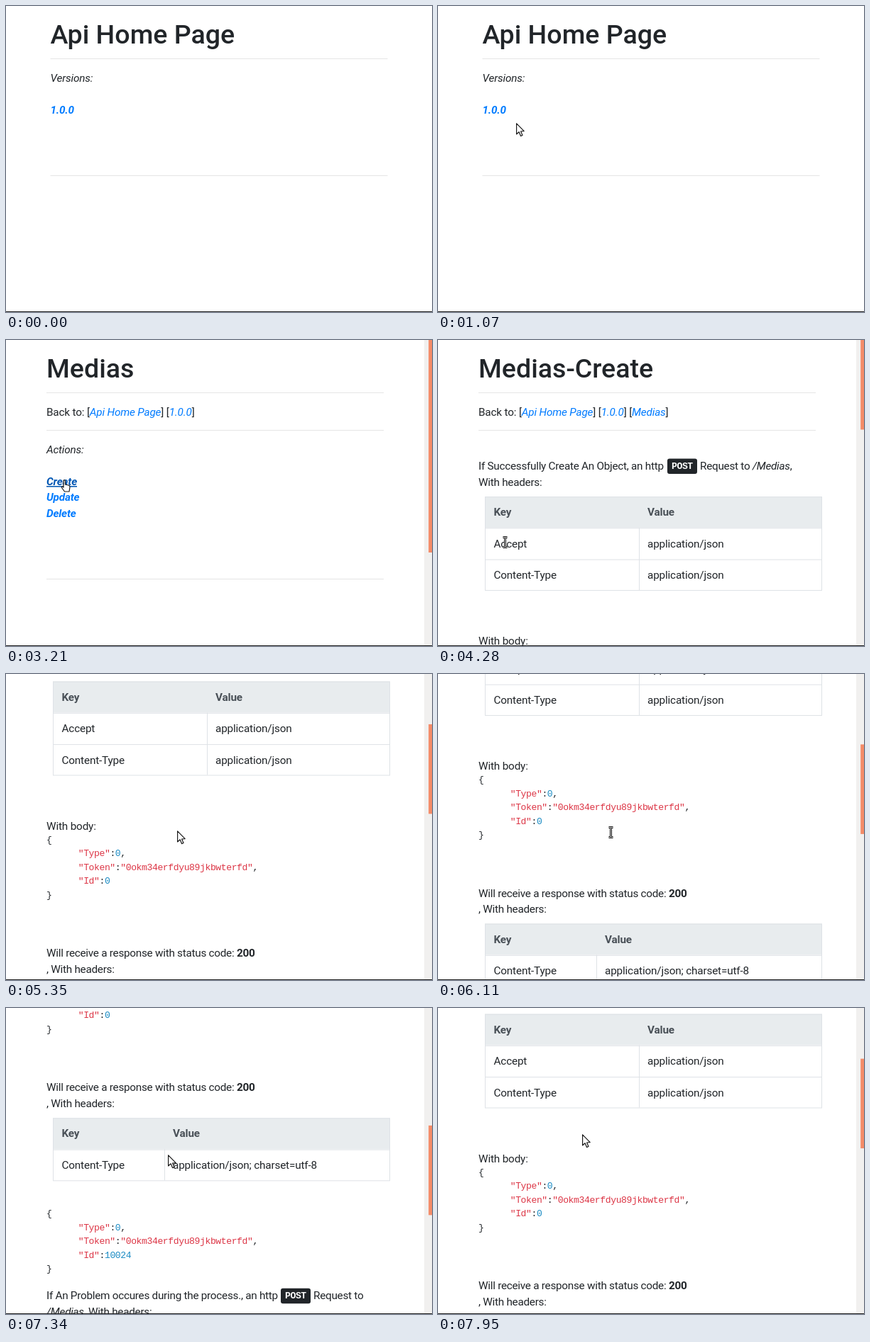
An HTML page for the animation above (8 s loop, 600x432 px).

```html
<!DOCTYPE html>
<html lang="en">
<head>
<meta charset="utf-8">
<title>Api pages</title>
<style>
html, body { margin: 0; width: 100%; height: 100%; overflow: hidden; background: #fff; }
svg { display: block; width: 600px; height: 432px; }
text { font: 15.3px Roboto, sans-serif; letter-spacing: -.17px; fill: #212529; white-space: pre; }
.title { font-size: 37.5px; font-weight: 500; letter-spacing: 0; }
.prose { letter-spacing: -.27px; }
.head { font-weight: 700; fill: #495057; }
.code, .badge { font: 13.125px "Liberation Mono", monospace; letter-spacing: -.42px; }
.badge { font-weight: 700; fill: #fff; }
.i { font-style: italic; }
.b { font-weight: 700; }
.link { font-style: italic; fill: #007bff; }
.str { fill: #dc3545; }
.num { fill: #1c8cc4; }
.hover .go { fill: #0056b3; text-decoration: underline; }
</style>
</head>
<body>
<svg id="stage" viewBox="0 0 600 432"></svg>
<script>
const LOOP = 8000, STEP = 152.9;
const BAR = 0.337; // thumb travel per scrolled pixel

const span = (cls, s) => `<tspan class="${cls}">${s}</tspan>`;
const text = (x, y, s, cls = '') => `<text x="${x}" y="${y}" class="${cls}">${s}</text>`;
const prose = (x, y, s) => text(x, y, s, 'prose');
const rect = (x, y, w, h, fill, more = '') =>
  `<rect x="${x}" y="${y}" width="${w}" height="${h}" fill="${fill}" ${more}/>`;
const rule = y => rect(0, y, 475, 1, '#e5e5e5');

function header(title, back) {
  let out = text(0, 52.5, title, 'title') + rule(74);
  if (back) {
    out += text(0, 107, 'Back to: ' + back.map(s => `[${span('link', s)}]`).join(' ')) + rule(127);
  }
  return out;
}

function list(y, label, items, go) {
  const rows = items.map((s, i) =>
    text(0, y + 45 + i * 22.3, s, 'link b' + (s === go ? ' go' : '')));
  return text(0, y, label, 'i') + rows.join('') + rule(Math.round(y + 132 + (items.length - 1) * 22.3));
}

function table(y, split, rows) {
  const edge = '#dee2e6';
  const h = 44 * (rows.length + 1);
  let out = rect(9, y, 475, 44, '#e8ecee') + text(21.5, y + 27, 'Key', 'head') +
    text(split + 12, y + 27, 'Value', 'head');
  rows.forEach(([key, value], i) => {
    const top = y + 44.3 * (i + 1);
    out += rect(9, top, 475, 1, edge) + text(21.5, top + 27.5, key) +
      text(split + 12, top + 27.5, value);
  });
  return out + rect(split, y + 44, 1, h - 44, edge) +
    rect(9.5, y + 0.5, 474, h, 'none', `stroke="${edge}"`);
}

function json(y, id) {
  const pair = (k, v) => span('str', `"${k}"`) + ':' + v;
  const rows = [
    pair('Type', span('num', 0)) + ',',
    pair('Token', span('str', '"0okm34erfdyu89jkbwterfd"')) + ',',
    pair('Id', span('num', id))
  ];
  return text(0, y, '{', 'code') +
    rows.map((s, i) => text(44.7, y + 19.5 * (i + 1), s, 'code')).join('') +
    text(0, y + 78, '}', 'code');
}

const post = (x, y) => rect(x, y - 14.5, 42, 21.5, '#212529', 'rx="3"') +
  text(x + 6, y, 'POST', 'badge');

const request = [['Accept', 'application/json'], ['Content-Type', 'application/json']];

const pages = [
  { x: 62.5, body: header('Api Home Page') + list(107, 'Versions:', ['1.0.0'], '1.0.0') },
  { x: 62.5, body: header('1.0.0', ['Api Home Page']) +
      list(160, 'Services:', ['Posts', 'Medias', 'Users'], 'Medias') },
  { x: 57, thumb: 300, body: header('Medias', ['Api Home Page', '1.0.0']) +
      list(160, 'Actions:', ['Create', 'Update', 'Delete'], 'Create') },
  { x: 57, thumb: 126.5, body: header('Medias-Create', ['Api Home Page', '1.0.0', 'Medias']) +
      prose(0, 182.5, 'If Successfully Create An Object, an http') + post(266, 182) +
      prose(312, 182.5, `Request to ${span('i', '/Medias')},`) +
      prose(0, 206, 'With headers:') +
      table(221, 226, request) +
      text(0, 430, 'With body:') + json(448, 0) +
      prose(0, 609.5, `Will receive a response with status code: ${span('b', 200)}`) +
      prose(0, 632, ', With headers:') +
      table(647.5, 166, [['Content-Type', 'application/json; charset=utf-8']]) +
      json(786.5, 10024) +
      prose(0, 903, 'If An Problem occures during the process., an http') + post(330, 902.5) +
      prose(376, 903, 'Request to') +
      prose(0, 926.5, `${span('i', '/Medias')}, With headers:`) +
      table(942, 226, request) }
];

const outline = 'fill="#fff" stroke="#1b1b1b" stroke-width="1.2" stroke-linejoin="round"';
const beam = 'M-3-7H-1Q0-7 0-6Q0-7 1-7H3M0-6V6M-3 7H-1Q0 7 0 6Q0 7 1 7H3';
const cursors = {
  arrow: `<path d="M.6.8V16L4.1 12.8 6.5 18.6 9 17.5 6.6 12 11.2 11.6Z" ${outline}/>`,
  hand: `<path d="M3 9V2Q3 .6 4.2.6T5.4 2V7L10 8Q12 8.5 12 10.5L11 17H4.5L.5 11.5Q.2 9.5 1.6 9.8L3 11Z" ${outline}/>`,
  beam: `<g transform="translate(2.5 2.5)" fill="none"><path d="${beam}" stroke="#111" stroke-width="3"/><path d="${beam}" stroke="#fff" stroke-width=".9"/></g>`
};

// step, x, y, scroll
const track = [
  [2, 545, 410, 0], [5, 300, 270, 0], [7, 110, 165, 0], [8, 84, 144, 0], [10, 84, 144, 0],
  [13, 127, 202, 0], [15, 92, 218, 0], [17, 92, 218, 0], [21, 78, 197, 0], [25, 78, 197, 0],
  [28, 92, 283, 0], [29, 203, 251, 0], [31, 241, 221, 0], [32, 241, 221, 0],
  [35, 241, 221, 210.5], [36, 241, 221, 275], [37, 241, 221, 295], [40, 241, 221, 295],
  [44, 241, 221, 584], [45, 241, 221, 632], [46, 241, 221, 632], [52, 203, 178, 212.5]
];
const shows = [[0, 0], [10, 1], [17, 2], [25, 3]];
const shapes = [[0, ''], [2, 'arrow'], [8, 'hand'], [10, 'arrow'], [15, 'hand'], [17, 'arrow'],
  [21, 'hand'], [25, 'arrow'], [28, 'beam'], [29, 'arrow'], [40, 'beam'], [48, 'arrow']];

const latest = (list, n) => list.filter(e => e[0] <= n).pop()[1];

function at(n) {
  const i = track.findIndex(k => k[0] >= n);
  if (i < 1) return track[i < 0 ? track.length - 1 : 0];
  const a = track[i - 1], b = track[i];
  const u = (n - a[0]) / (b[0] - a[0]);
  return a.map((v, j) => v + (b[j] - v) * u);
}

const stage = document.getElementById('stage');
stage.innerHTML =
  pages.map(p => `<g class="page"><g class="body">${p.body}</g>` +
    (p.thumb ? rect(589, 0, 11, 432, '#f1f0ef') +
      rect(595.2, 0, 4.8, p.thumb, '#f48b68', 'class="thumb"') : '') + '</g>').join('') +
  rect(0, 431, 600, 1, '#222') +
  '<g id="pointer">' +
  Object.entries(cursors).map(([k, s]) => `<g data-kind="${k}">${s}</g>`).join('') + '</g>';

const views = [...stage.querySelectorAll('.page')];
const pointer = document.getElementById('pointer');
const start = performance.now();
let last = -1;

function draw(n) {
  const [, x, y, scroll] = at(n);
  const page = latest(shows, n), kind = latest(shapes, n);
  views.forEach((v, i) => {
    v.style.display = i === page ? '' : 'none';
    v.querySelector('.body').setAttribute('transform', `translate(${pages[i].x} ${-scroll})`);
    const thumb = v.querySelector('.thumb');
    if (thumb) thumb.setAttribute('y', scroll * BAR);
  });
  stage.classList.toggle('hover', kind === 'hand');
  pointer.setAttribute('transform', `translate(${Math.round(x)} ${Math.round(y)})`);
  for (const c of pointer.children) c.style.display = c.dataset.kind === kind ? '' : 'none';
}

function tick() {
  const t = Math.max(0, performance.now() - start) % LOOP;
  const n = Math.min(52, Math.floor((t + 7) / STEP));
  if (n !== last) draw(last = n);
  requestAnimationFrame(tick);
}
tick();
</script>
</body>
</html>
```
